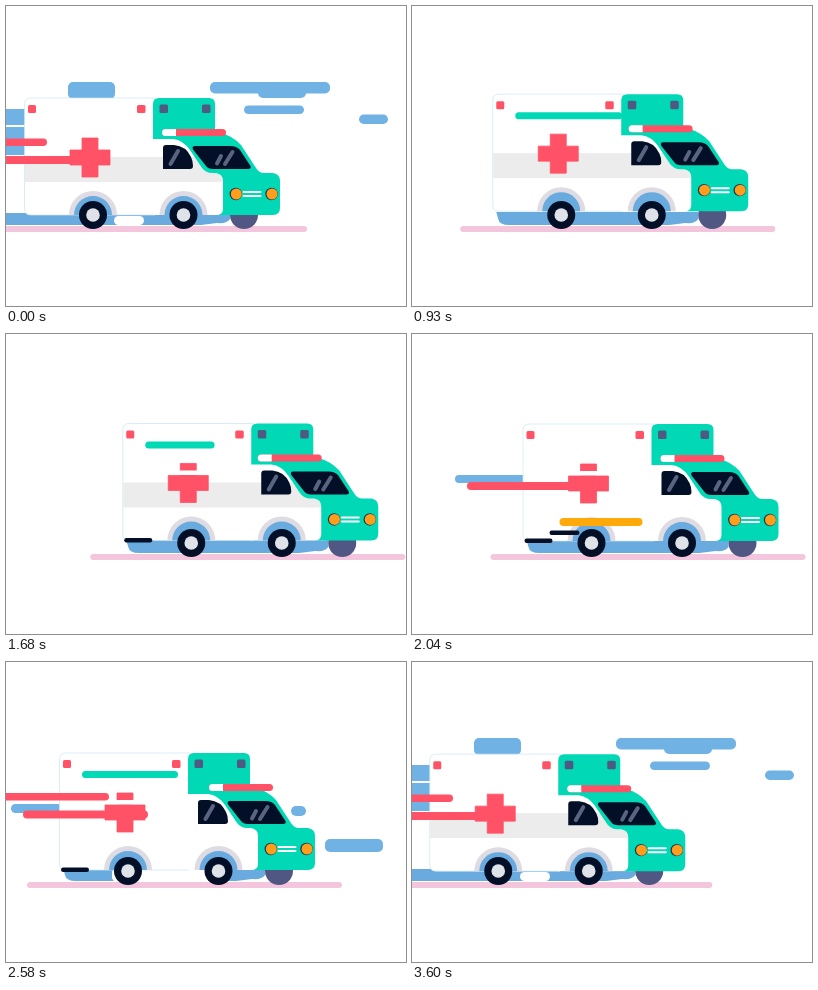
An HTML page for the animation above (3.63 s loop, 400 px wide and 300 px high).

```html
<!DOCTYPE html>
<html lang="en">
<head>
<meta charset="utf-8">
<title>Ambulance</title>
<style>
  html, body { margin: 0; width: 100%; height: 100%; overflow: hidden; background: #fff; }
  svg { display: block; width: 400px; height: 300px; }
</style>
</head>
<body>
<svg viewBox="0 0 400 300">
  <defs>
    <path id="arch" d="M-1 0a1 1 0 0 1 2 0Z"/>
    <g id="wheel"><circle r="14" fill="#020f26"/><circle r="6.800" fill="#dfe2e8"/></g>
    <g id="fender">
      <use href="#arch" transform="scale(24)" fill="#dedce2"/>
      <use href="#arch" transform="scale(19)" fill="#69abde"/>
    </g>
    <g id="lamp"><circle r="6.200" fill="#23324a"/><circle cx=".5" r="5.500" fill="#ff9d1c"/></g>
  </defs>
  <g id="sky"></g>
  <g class="car">
    <rect x="-101" y="220" width="315" height="6" rx="3" fill="#f3c6dd"/>
    <path d="M-65 206H137V213Q134 218 124 217L108 219H-52Q-62 219 -63 213Z" fill="#69abde"/>
    <circle cx="151" cy="209" r="14" fill="#515783"/>
  </g>
  <g id="under"></g>
  <g class="car"><g class="body">
    <path d="M-68.500 96Q-68.500 90 -62 90H62V207H-62Q-68.500 207 -68.500 201Z" fill="#fff" stroke="#c9e6f4" stroke-width=".7"/>
    <rect x="60" y="125" width="75" height="82" fill="#fff"/>
    <rect id="band" x="-68" y="149" height="25" fill="#ebeceb"/>
    <path d="M60 131V96Q60 90 66 90H116Q122 90 122 96V124H126Q140 128 148 137L163 160Q166 165 171 165H180Q187 166 187 173V200Q187 207 180 207H123Q130 207 130 201V173Q130 166 123 165H119Q113 165 109 160L97 142Q90 132 80 131Z" fill="#00d8b6"/>
    <g fill="#ff5266">
      <rect x="-65" y="97" width="8" height="8" rx="1.5"/>
      <rect x="44" y="97" width="8.500" height="8" rx="1.5"/>
    </g>
    <g fill="#4f5a83">
      <rect x="66.500" y="96.500" width="8.500" height="8.500" rx="1.5"/>
      <rect x="109" y="96.500" width="8.500" height="8.500" rx="1.5"/>
    </g>
    <g fill="#020f26">
      <path d="M70 140Q70 137 73 137H81Q93 138 98 149Q100 153 100 158Q100 161 97 161H70Z"/>
      <path d="M102 138H137Q144 138 147 142L157.500 158Q158.500 161 155 161H120Q115 161 113 158L100 141.500Q98.500 138 102 138Z"/>
    </g>
    <path d="M77.500 156L85 143M124 155.500L128 148M132 156L139.500 144" stroke="#5a6480" stroke-width="4" stroke-linecap="round"/>
    <path d="M150.500 184H167.500M150.500 188H167.500" stroke="#fff" stroke-width="2" stroke-linecap="round"/>
    <use href="#lamp" x="142.800" y="186"/><use href="#lamp" x="178.500" y="186"/>
    <g id="siren">
      <rect y="121" width="64" height="7" rx="3.500" fill="#ff5266"/>
      <path d="M14 121v7H3.500a3.500 3.500 0 0 1 0-7Z" fill="#fff"/>
    </g>
    <use href="#fender" y="207"/><use href="#fender" x="90.500" y="207"/>
  </g></g>
  <g id="dash"></g>
  <g class="car">
    <g class="body">
      <path d="M-11 130H5V142H17V157H5V169H-11V157H-23V142H-11Z" fill="#ff5266" stroke="#ff5266" stroke-width=".8" stroke-linejoin="round"/>
      <rect id="gap" x="-12" y="137" width="18" height="4.500" fill="#fff"/>
      <rect id="stripe" x="-46" y="108" height="7" rx="3.500" fill="#00d8b6"/>
      <rect id="sill" x="-67" y="204.500" height="4.500" rx="2.200" fill="#020f26"/>
      <g id="trim"></g>
    </g>
    <use href="#wheel" y="209"/><use href="#wheel" x="90.500" y="209"/>
  </g>
</svg>
<script>
const LOOP = 3630, LIFE = 240;
const BLUE = '#70b2e4', RED = '#ff5266', AMBER = '#ffaa0a', NAVY = '#020f26';
const $ = id => document.getElementById(id);

// Key poses: time, car x, body bounce, siren x
const poses = [
  [0, 87, 2, 69], [570, 120, -2, 69], [1320, 176, -1, 66],
  [2040, 179.5, 0, 69], [2580, 122, 1, 81], [3120, 90.5, 3, 69],
];

// Smooth cyclic curve through one column of the poses.
function pose(col, t) {
  const n = poses.length;
  const time = i => poses[(i + n) % n][0] + Math.floor(i / n) * LOOP;
  const value = i => poses[(i + n) % n][col];
  const slope = i => (value(i + 1) - value(i - 1)) / (time(i + 1) - time(i - 1));
  let i = 0;
  while (time(i + 1) <= t) i++;
  const d = time(i + 1) - time(i), u = (t - time(i)) / d;
  return value(i) + (value(i + 1) - value(i)) * u * u * (3 - 2 * u)
    + d * u * (1 - u) * ((1 - u) * slope(i) - u * slope(i + 1));
}

// Eased 0 to 1 between two times.
function ramp(t, from, to) {
  const u = Math.min(1, Math.max(0, (t - from) / (to - from)));
  return u * u * (3 - 2 * u);
}

// Each streak grows leftwards up to its moment, then slips away to the left.
const streaks = [];
function streak(layer, fill, at, x, y, width, height) {
  const el = document.createElementNS('http://www.w3.org/2000/svg', 'rect');
  const attrs = { y, height, rx: Math.min(5, height / 2), fill };
  for (const k in attrs) el.setAttribute(k, attrs[k]);
  $(layer).append(el);
  streaks.push({ el, at, x, width });
}

function drawStreak({ el, at, x, width }, t) {
  const dt = (t - at + LOOP * 1.5) % LOOP - LOOP / 2;
  const w = width * (1 - ramp(Math.abs(dt), 30, LIFE));
  el.setAttribute('x', dt < 0 ? x + width - w : x);
  el.setAttribute('width', w);
}

streak('sky', BLUE, 0, 204, 76, 120, 11.5);
streak('sky', BLUE, 0, 252, 82, 48, 10);
streak('sky', BLUE, 0, 238, 99.5, 60, 8.5);
streak('sky', BLUE, 0, 353, 108.5, 29, 9.5);
streak('sky', BLUE, 0, 62, 76, 47, 17);
streak('sky', BLUE, 0, -8, 103, 32, 16);
streak('sky', BLUE, 0, -8, 121, 32, 28);
streak('sky', BLUE, 570, 245, 76, 87, 10);
streak('sky', BLUE, 570, -8, 98, 41, 16);
streak('sky', BLUE, 570, -8, 131, 56, 13);
streak('sky', BLUE, 1320, 150, 76, 197, 10);
streak('sky', BLUE, 1320, 17, 137, 40, 9);
streak('sky', BLUE, 2040, 43, 141, 71, 8);
streak('sky', BLUE, 2580, 5, 142, 51, 9);
streak('sky', BLUE, 2580, 285, 144, 15, 10);
streak('sky', BLUE, 2580, 319, 177, 58, 13);

streak('under', '#69abde', 0, -8, 207, 70, 12);
streak('under', '#fff', 0, 108, 210, 30, 9);
streak('under', '#fff', 2580, 106, 206, 98, 14);
streak('under', NAVY, 570, 74, 213, 46, 5.5);

streak('dash', RED, 0, -8, 132.5, 49, 7.5);
streak('dash', RED, 0, -8, 150, 92, 8);
streak('dash', RED, 1320, 44, 147, 26, 8);
streak('dash', RED, 2040, 55, 148, 121, 8);
streak('dash', RED, 2580, -8, 131, 111, 7.5);
streak('dash', RED, 2580, 17, 148.5, 125, 8);

streak('trim', AMBER, 570, 25, 181, 14, 8);
streak('trim', AMBER, 2040, -32, 184, 83, 8);
streak('trim', AMBER, 3120, 22, 181, 100, 8);
streak('trim', NAVY, 2040, -42, 196.5, 30, 4.5);

const cars = document.querySelectorAll('.car'), bodies = document.querySelectorAll('.body');
const move = (el, x, y) => el.setAttribute('transform', `translate(${x.toFixed(2)} ${y.toFixed(2)})`);
const widen = (id, w) => $(id).setAttribute('width', w);

function draw(t) {
  cars.forEach(el => move(el, pose(1, t), 0));
  bodies.forEach(el => move(el, 0, pose(2, t)));
  move($('siren'), pose(3, t), 0);
  widen('band', 200 * (1 - ramp(t, 1700, 1980) + ramp(t, 2800, 3000)));
  widen('stripe', 107 * (ramp(t, 150, 400) - ramp(t, 1500, 1950)) + 96 * (ramp(t, 2250, 2550) - ramp(t, 2700, 3500)));
  widen('sill', 28 * (ramp(t, 1000, 1300) - ramp(t, 2600, 2850)));
  widen('gap', t > 1000 && t < 2900 ? 18 : 0);
  streaks.forEach(s => drawStreak(s, t));
}

const start = performance.now();
function tick() {
  const t = (performance.now() - start) % LOOP;
  draw(Math.floor(t / 30) * 30);
  requestAnimationFrame(tick);
}
tick();
</script>
</body>
</html>
```
